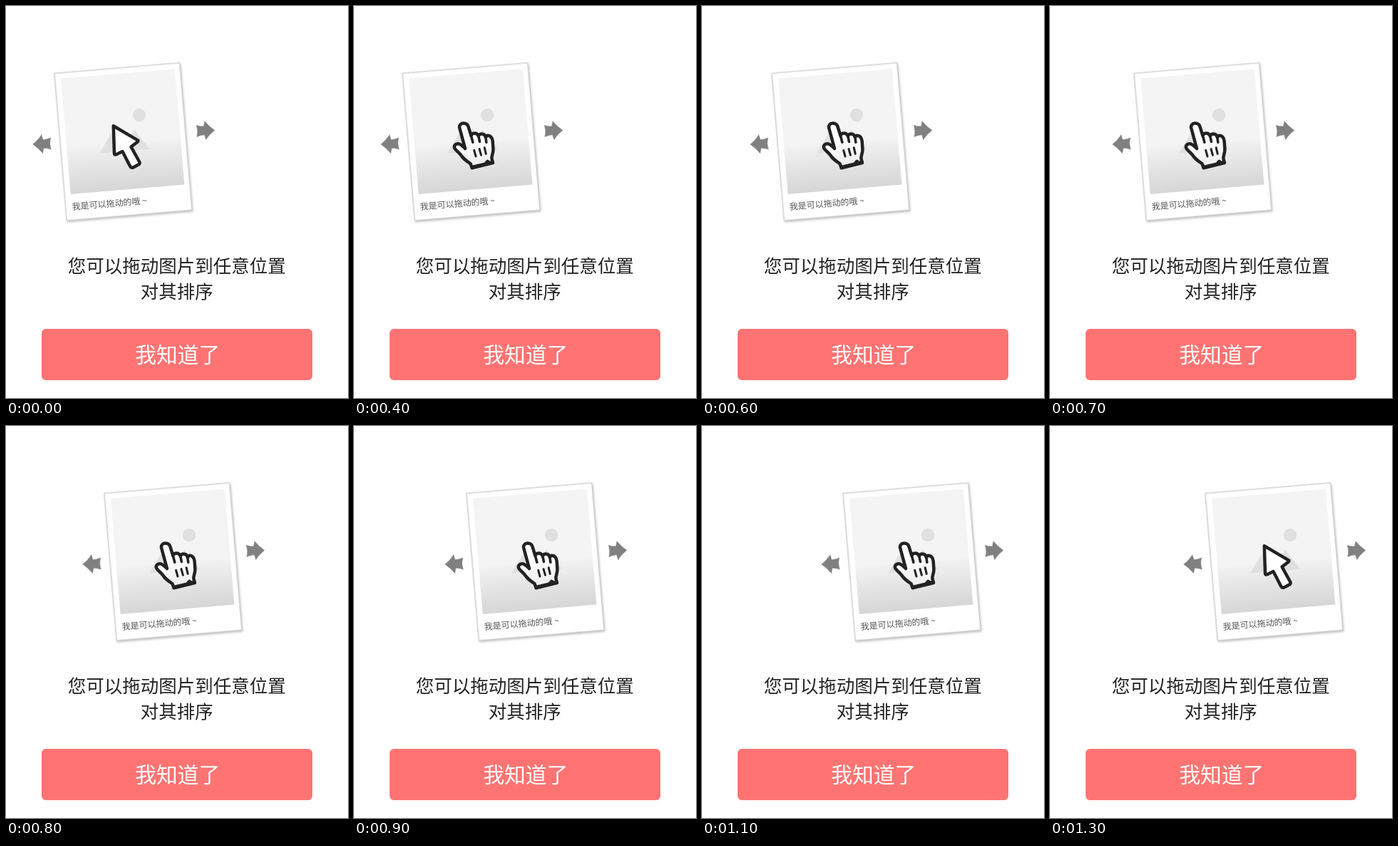
An HTML page for the animation above (1700 ms loop, 480 by 550 pixels).

```html
<!DOCTYPE html>
<html lang="zh-CN">
<head>
<meta charset="utf-8">
<title>拖动排序提示</title>
<style>
  html, body { margin: 0; width: 100%; height: 100%; overflow: hidden; background: #fff; }
  svg { display: block; width: 480px; height: 550px; }
  text { font-family: "Noto Sans CJK SC", "Noto Sans CJK", sans-serif; font-weight: 350; }
  .message { font-size: 25.5px; fill: #222; text-anchor: middle; }
  .label { font-size: 29.8px; fill: #fff; text-anchor: middle; }
  .caption { font-size: 12px; fill: #555; font-weight: 400; }
  .paper { fill: #fff; stroke: #c0c0c0; filter: drop-shadow(1.5px 2px 1.5px rgba(0, 0, 0, .24)); }
  .scenery { fill: #e0e0e0; }
  .arrow { fill: #808080; stroke: #999; stroke-width: .5; }
  .cursor { fill: #fff; stroke: #222; stroke-width: 4.5; stroke-linejoin: round; stroke-linecap: round; }

  .drag { animation: drag 1.7s infinite; }
  .pointer { animation: show-pointer 1.7s step-end infinite; }
  .hand { animation: show-hand 1.7s step-end infinite; }

  /* Seven 20px jumps, one every 100ms, from 500ms to 1200ms */
  @keyframes drag {
    0% { transform: translateX(0); animation-timing-function: step-end; }
    29.41% { transform: translateX(10px); animation-timing-function: steps(7, end); }
    70.58%, 100% { transform: translateX(150px); }
  }
  @keyframes show-pointer {
    0%, 76.47% { visibility: visible; }
    23.529% { visibility: hidden; }
    100% { visibility: visible; }
  }
  @keyframes show-hand {
    0%, 76.47% { visibility: hidden; }
    23.529% { visibility: visible; }
    100% { visibility: hidden; }
  }
</style>
</head>
<body>
<svg viewBox="0 0 480 550">
  <defs>
    <linearGradient id="floor" x1="0" y1="0" x2="0" y2="1">
      <stop offset="0" stop-color="#f4f4f4"/>
      <stop offset=".59" stop-color="#f4f4f4"/>
      <stop offset=".62" stop-color="#f0f0f0"/>
      <stop offset="1" stop-color="#d6d6d6"/>
    </linearGradient>
    <linearGradient id="palm" x1="0" y1="0" x2="0" y2="1">
      <stop offset=".3" stop-color="#fff"/>
      <stop offset="1" stop-color="#ececec"/>
    </linearGradient>
    <path id="arrow" class="arrow" d="M37.6 194Q45 188.6 49.8 180.6L52 187.6Q57.4 187.2 62.8 184.8 60.4 193 63.4 201.2 58 199.2 53 199.6L51.6 206.8Q45.6 199.4 37.6 194Z"/>
  </defs>

  <g class="drag">
    <use href="#arrow"/>
    <use href="#arrow" transform="rotate(180 165.25 184.2)"/>

    <g transform="translate(68 94.5) rotate(-4.8)">
      <rect class="paper" width="176.2" height="207.2"/>
      <rect x="8.4" y="8" width="160.3" height="162.8" fill="url(#floor)"/>
      <text class="caption" x="9" y="193">我是可以拖动的哦 ~</text>
    </g>

    <g class="scenery">
      <circle cx="187" cy="153" r="9.2"/>
      <path d="M131 206.8 153 170 170 190 180 173.5 201.5 201Z"/>
    </g>

    <path class="cursor pointer" d="M150.8 168.2 185.3 188.6Q185.6 190 184.4 190.8L175.6 197.6 187.4 219Q188.2 221.2 186 222.6L178.6 226.4Q176 227.6 174.4 225.2L163.4 204 154.4 208.4Q152.2 209 152 206.8Z"/>

    <g class="cursor hand">
      <path fill="url(#palm)" d="M148.4 172C146.8 167.4 150 164.8 153.4 164.6 157 164.4 159.6 166.4 160.6 169.6L164.4 182C164.6 179.6 167 178.4 169.4 178.4 172.4 178.4 174 180.2 174.8 182.6 175.4 180.2 177.2 179.4 179.4 179.4 182.4 179.4 184 181.2 184.8 184.2 185.4 182.4 187.2 181.6 189.2 182 192.8 182.8 194 185.6 194.6 189.4L195.4 201C195.6 206.6 192.8 210 193.4 214.4L195 220 165.6 227.2 163.6 221.4C157 217 153.4 214.6 149.8 208.8 147 205 143.6 203.4 141.4 199.8 139.4 195.6 143.4 192.4 147.4 193.4 151.2 194.6 153.2 197.4 156 200Z"/>
      <path d="M164.4 182 166.8 191.2M174.8 182.6 176.4 190.4M184.8 184.2 185.8 191.2" stroke-width="3.6"/>
      <path d="M168.6 202.4 171 211M176 200.6 178.4 209.2M183.2 198.8 185.2 207.4" stroke-width="3"/>
      <path d="M166 225.8 184 221.4 187.4 217.6 190.4 219.8 194.4 218.8" fill="none" stroke-width="4"/>
    </g>
  </g>

  <text class="message" x="239.8" y="374.2">您可以拖动图片到任意位置</text>
  <text class="message" x="239.8" y="410.2">对其排序</text>
  <rect x="50" y="453" width="380" height="72" rx="6" fill="#ff7473"/>
  <text class="label" x="240.8" y="499.6">我知道了</text>
</svg>
</body>
</html>
```
